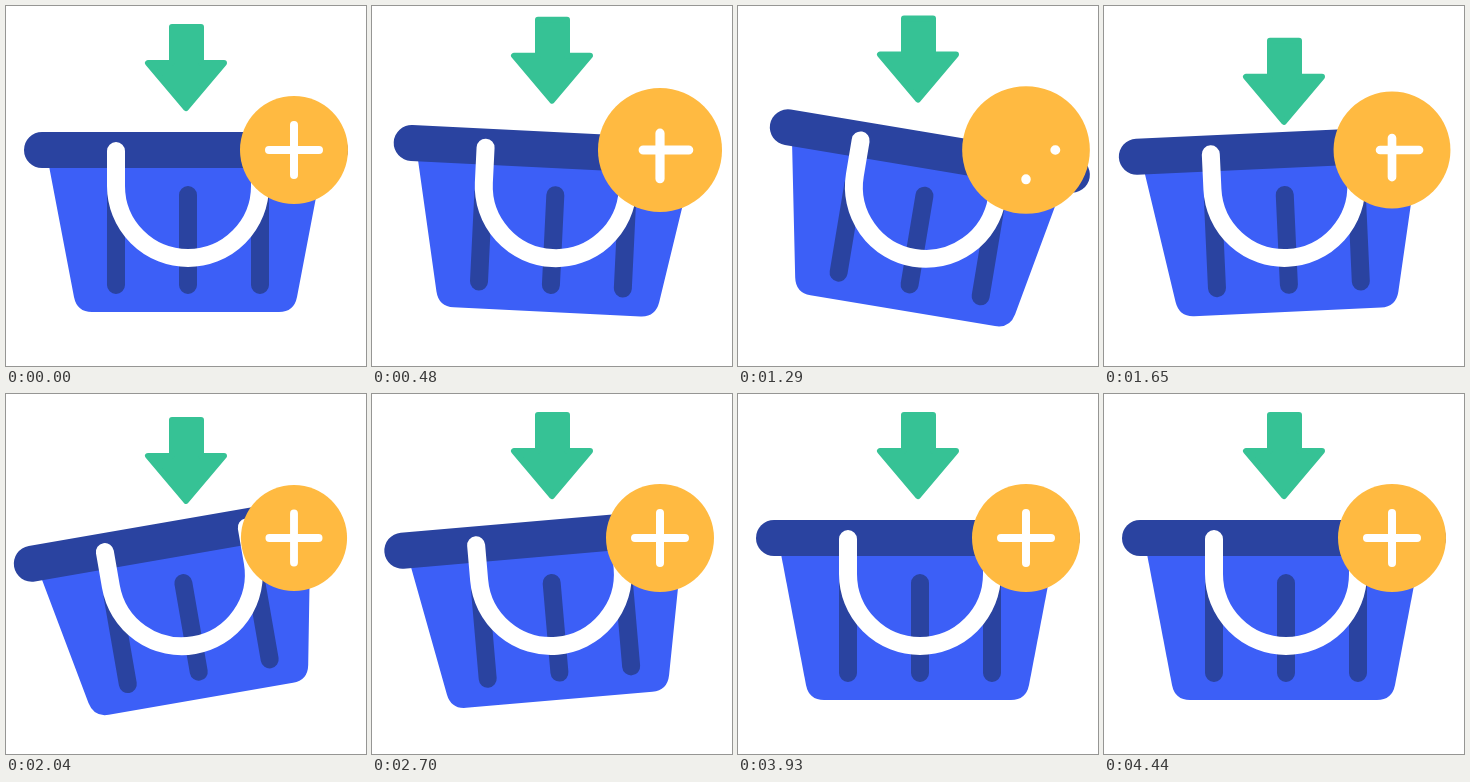
Write an HTML page that moves like this. It is 360x360 px and loops after 4500 ms.

```html
<!DOCTYPE html>
<html lang="en">
<head>
<meta charset="utf-8">
<title>Add to basket</title>
<style>
  html, body { margin: 0; height: 100%; overflow: hidden; background: #fff; }
  svg { display: block; width: 100%; height: 100%; }
  path { stroke-linecap: round; stroke-linejoin: round; }
</style>
</head>
<body>
<svg viewBox="0 0 360 360">
  <path id="arrow" d="M166 21H195V57H218L180 102L142 57H166Z" fill="#36c295" stroke="#36c295" stroke-width="6"/>
  <g id="basket" fill="none">
    <path d="M43 160L68 291Q71 306 86 306H273Q288 306 291 291L316 160Z" fill="#3c5ff7"/>
    <path d="M36 144H324" stroke="#2a43a0" stroke-width="36"/>
    <path d="M110 189V279M182 189V279M254 189V279" stroke="#2a43a0" stroke-width="18"/>
    <path d="M110 145V180A72 72 0 0 0 254 180V145" stroke="#fff" stroke-width="18"/>
  </g>
  <g id="badge">
    <circle r="54" fill="#ffba41"/>
    <path id="plus" stroke="#fff" stroke-width="8"/>
  </g>
</svg>
<script>
const LOOP = 4500, BEAT = 1080;
const [arrow, basket, badge, plus] =
  ['arrow', 'basket', 'badge', 'plus'].map(id => document.getElementById(id));

const smooth = u => u * u * (3 - 2 * u);

// Sharper ease: cubic-bezier(.8, 0, .2, 1), solved by bisection
function snap(x) {
  let low = 0, high = 1;
  for (let i = 0; i < 20; i++) {
    const u = (low + high) / 2;
    const at = 3 * (1 - u) * u * (0.8 - 0.6 * u) + u ** 3;
    if (at < x) low = u; else high = u;
  }
  return smooth(low);
}

function draw(t) {
  // Eased rise from 0 to 1 that begins at start and lasts span
  const step = (start, span, ease = smooth) =>
    ease(Math.min(1, Math.max(0, (t - start) / span)));
  const swing = beat => step(beat * BEAT, BEAT, snap);

  const tilt = 10 * (swing(0) - 2 * swing(1) + swing(2));
  const lift = -17.5 * step(0, BEAT) + 31.5 * step(BEAT, 600) - 14 * step(BEAT + 600, 600);
  const scale = 1 + 0.2 * step(0, 720) - 0.225 * step(1110, 1050) + 0.025 * step(2160, 540);
  const erased = step(305, 600) - step(1260, 600);
  const start = -25 + 49.99 * erased;

  basket.setAttribute('transform', `rotate(${tilt} 180 216)`);
  arrow.setAttribute('transform', `translate(0 ${lift})`);
  badge.setAttribute('transform', `translate(288 144) scale(${scale})`);
  plus.setAttribute('d', `M${start} 0H25M0 ${start}V25`);
}

const begin = performance.now();
function frame() {
  draw((performance.now() - begin) % LOOP);
  requestAnimationFrame(frame);
}
frame();
</script>
</body>
</html>
```
